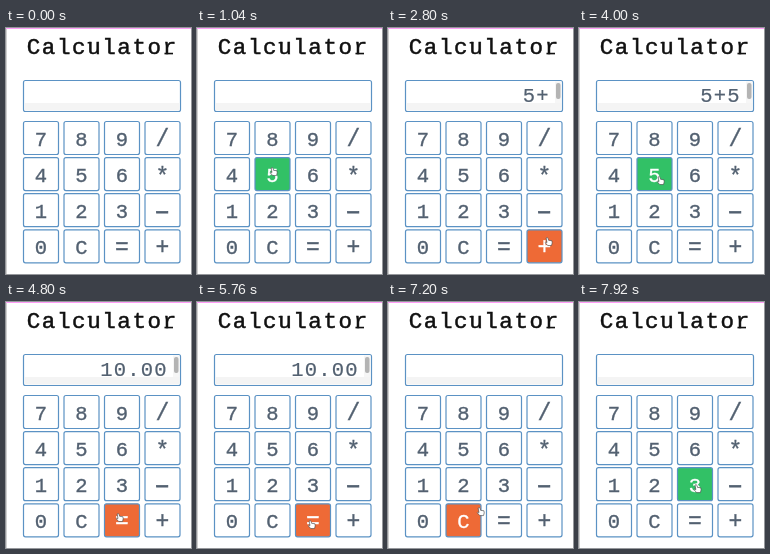
Animation of 185 by 246 pixels, one loop 8000 ms. Source, as an HTML page with a canvas:

```html
<!DOCTYPE html>
<html lang="en">
<head>
<meta charset="utf-8">
<title>Calculator</title>
<style>
html, body { margin: 0; width: 100%; height: 100%; overflow: hidden; background: #fff; }
canvas { display: block; width: 185px; height: 246px; }
</style>
</head>
<body>
<canvas id="stage"></canvas>
<script>
const W = 185, H = 246, LOOP = 8000, STEP = 80;
const canvas = document.getElementById('stage');
const ctx = canvas.getContext('2d');
const scale = Math.max(1, window.devicePixelRatio || 1);
canvas.width = W * scale;
canvas.height = H * scale;

const FONT = '"Liberation Mono", "Courier New", monospace';
const BLUE = '#5b92c4', INK = '#536171', GREEN = '#32c166', ORANGE = '#ee6a36';
const ROWS = ['789/', '456*', '123−', '0C=+'];
const KEY = { x: 17.5, y: 93.5, w: 35, h: 33, dx: 40.5, dy: 36.1 };

// Pointer stops: time, x, y
const PATH = [
  [560, 182, 196], [960, 77, 143], [1040, 75, 140], [1500, 79, 148], [2080, 80, 148],
  [2480, 159, 210], [3040, 159, 210], [3520, 80, 149], [4080, 80, 149],
  [4480, 112, 212], [4960, 112, 212], [5600, 113, 219], [6480, 113, 219],
  [6640, 78, 218], [7040, 78, 218], [7440, 115, 184], [8000, 117, 183]
];
// Display contents from each time on
const SHOWN = [[0, ''], [1520, '5'], [2560, '5+'], [3680, '5+5'], [4640, '10.00'], [6800, '']];
const PRESSES = [1440, 2480, 3600, 4560, 6400, 6720], PRESS_LENGTH = 160;

// Slab serifs, as x1, x2, y in em from the left end of the baseline
const SLABS = { r: [0.08, 0.46, -0.02], u: [0.02, 0.18, -0.5] };

const ease = u => u * u * (3 - 2 * u);

function pointerAt(t) {
  if (t < PATH[0][0]) return null;
  const i = PATH.findIndex(p => p[0] > t);
  const [t0, x0, y0] = PATH[i - 1], [t1, x1, y1] = PATH[i];
  const u = ease((t - t0) / (t1 - t0));
  return { x: x0 + (x1 - x0) * u, y: y0 + (y1 - y0) * u };
}

function box(x, y, w, h, fill) {
  ctx.beginPath();
  ctx.roundRect(x, y, w, h, 2);
  ctx.fillStyle = fill;
  ctx.fill();
  ctx.strokeStyle = BLUE;
  ctx.lineWidth = 1.2;
  ctx.stroke();
}

function label(str, x, y, size, color, weight) {
  ctx.font = size + 'px ' + FONT;
  ctx.textAlign = 'center';
  ctx.fillStyle = ctx.strokeStyle = color;
  ctx.lineWidth = weight;
  ctx.fillText(str, x, y);
  ctx.strokeText(str, x, y);
}

// Sets characters on a fixed pitch, the first one centred on x
function spaced(str, x, y, size, pitch, color, weight) {
  [...str].forEach((ch, i) => label(ch, x + i * pitch, y, size, color, weight));
}

function drawTitle() {
  const text = 'Calculator', size = 22.5, pitch = 15.1, x = 27.5, y = 26;
  spaced(text, x, y, size, pitch, '#111', 0.5);
  ctx.lineWidth = 1.6;
  [...text].forEach((ch, i) => {
    if (!SLABS[ch]) return;
    const [a, b, h] = SLABS[ch], left = x + i * pitch - size * 0.3;
    ctx.beginPath();
    ctx.moveTo(left + a * size, y + h * size);
    ctx.lineTo(left + b * size, y + h * size);
    ctx.stroke();
  });
}

function drawDisplay(text) {
  box(17.5, 52.5, 157, 31, '#fff');
  ctx.fillStyle = '#f4f4f4';
  ctx.fillRect(18.5, 75, 155, 7.5);
  if (!text) return;
  ctx.fillStyle = '#f6f6f6';
  ctx.fillRect(167, 53.5, 6.5, 21.5);
  ctx.beginPath();
  ctx.roundRect(168, 55, 4.5, 16, 2);
  ctx.fillStyle = '#b4b4b4';
  ctx.fill();
  const pitch = 13.5;
  spaced(text, 154.3 - (text.length - 1) * pitch, 73.5, 20.5, pitch, INK, 0.2);
}

function drawKey(ch, col, row, p, pressed) {
  const x = KEY.x + col * KEY.dx, y = KEY.y + row * KEY.dy;
  const hot = p && p.x >= x && p.x <= x + KEY.w && p.y >= y && p.y <= y + KEY.h;
  const digit = /\d/.test(ch);
  ctx.globalAlpha = hot && pressed ? 0.87 : 1;
  box(x, y, KEY.w, KEY.h, hot ? (digit ? GREEN : ORANGE) : '#fff');
  const size = digit || ch === 'C' ? 20.5 : 23;
  const drop = ch === '*' ? 26.5 : ch === '−' ? 26 : size === 23 ? 24.5 : 24;
  label(ch, x + KEY.w / 2, y + drop, size, hot ? '#fff' : INK, ch === '−' ? 0.9 : 0.35);
  ctx.globalAlpha = 1;
}

function drawHand({ x, y }) {
  ctx.save();
  ctx.translate(x, y);
  ctx.scale(0.9, 0.9);
  ctx.beginPath();
  ctx.moveTo(-1, 0);
  ctx.quadraticCurveTo(0.3, -1.2, 1.2, 0.4);
  ctx.lineTo(1.8, 2.6);
  ctx.lineTo(5.4, 3);
  ctx.quadraticCurveTo(6.4, 5, 5, 8.4);
  ctx.lineTo(0.8, 8.4);
  ctx.lineTo(-2, 5.2);
  ctx.quadraticCurveTo(-1.6, 4, 0, 5);
  ctx.closePath();
  ctx.fillStyle = '#fff';
  ctx.fill();
  ctx.strokeStyle = '#444';
  ctx.lineWidth = 0.7;
  ctx.stroke();
  ctx.restore();
}

function draw(t) {
  ctx.setTransform(scale, 0, 0, scale, 0, 0);
  ctx.fillStyle = '#fff';
  ctx.fillRect(0, 0, W, H);
  ctx.fillStyle = '#d0d0d0';
  ctx.fillRect(0, 1, 1, H);
  ctx.fillStyle = '#ff9cf8';
  ctx.fillRect(0, 0, W, 1);

  drawTitle();
  drawDisplay(SHOWN.filter(s => s[0] <= t).pop()[1]);
  const p = pointerAt(t);
  const pressed = PRESSES.some(s => t >= s && t < s + PRESS_LENGTH);
  ROWS.forEach((keys, row) => [...keys].forEach((ch, col) => drawKey(ch, col, row, p, pressed)));
  if (p) drawHand(p);
}

const start = performance.now();
function tick() {
  const t = (performance.now() - start) % LOOP;
  draw(Math.floor(t / STEP) * STEP);
  requestAnimationFrame(tick);
}
tick();
</script>
</body>
</html>
```
